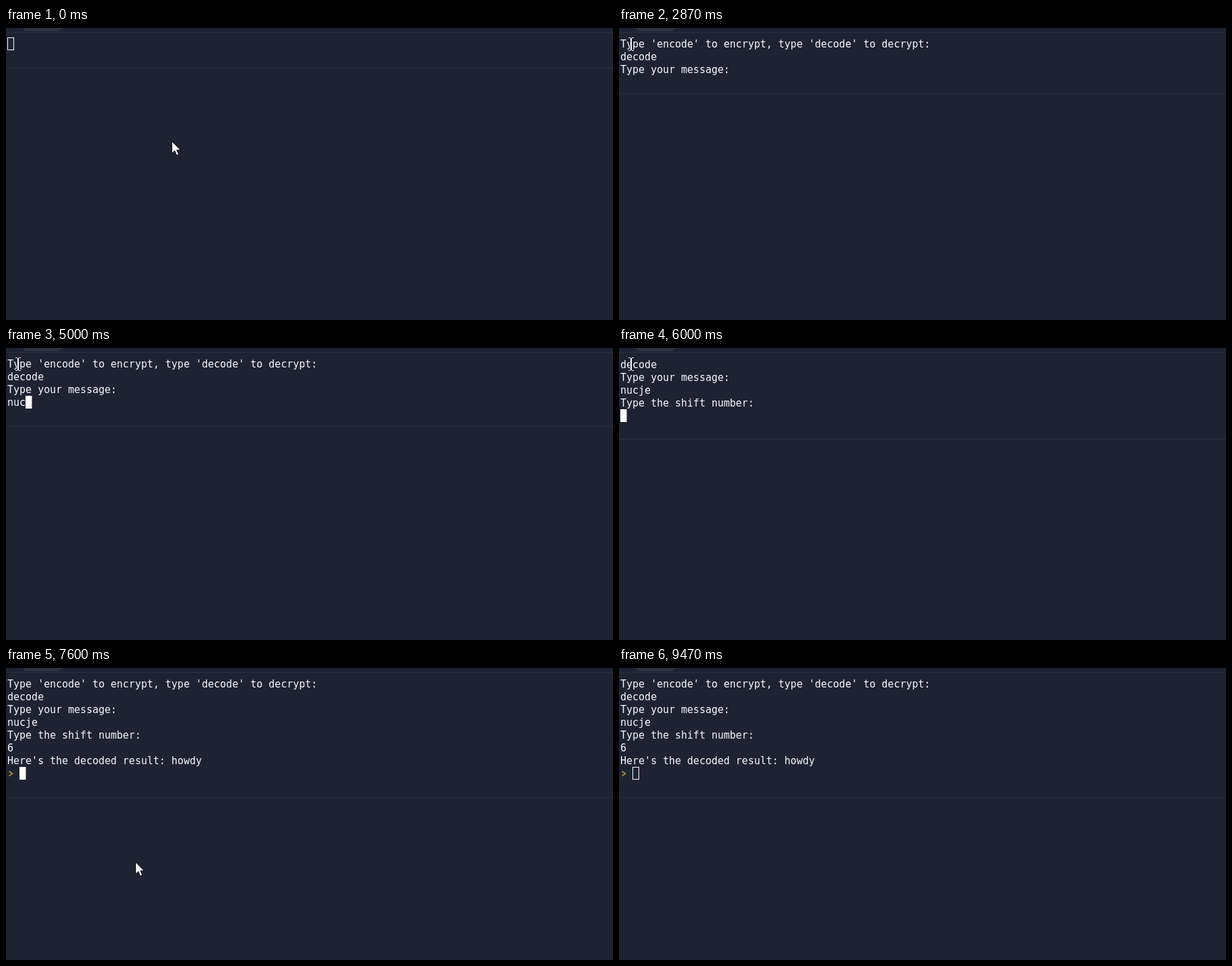
Write an HTML page that moves like this. It is 902 px wide and 434 px high and loops after 9600 ms.

```html
<!DOCTYPE html>
<html lang="en">
<head>
<meta charset="utf-8">
<title>Cipher console</title>
<style>
  html, body { margin: 0; width: 100%; height: 100%; overflow: hidden; background: #1e2333; }
  svg { display: block; }
  text { font: 15px "DejaVu Sans Mono", monospace; fill: #f5f9fc; white-space: pre; }
</style>
</head>
<body>
<svg width="902" height="434" viewBox="0 0 902 434">
  <rect width="902" height="434" fill="#1e2333"/>
  <rect x="25" y="-8" width="58" height="13" rx="6" fill="#2b3042"/>
  <rect y="6" width="902" height="1" fill="#2b3142"/>
  <rect id="divider" width="902" height="1" fill="#2b3142"/>
  <g id="lines"></g>
  <path id="prompt" d="M4.5 153.5L9.5 157L4.5 160.5" fill="none" stroke="#a98c2c" stroke-width="1.8"/>
  <rect id="block" fill="#fff"/>
  <rect id="frame" fill="none" stroke="#fff"/>
  <g id="beam">
    <path d="M-4 -9.5H-1M1 -9.5H4M0 -8.5V8.5M-4 9.5H-1M1 9.5H4" fill="none" stroke="#1e2333" stroke-width="4"/>
    <path d="M-4 -9.5H-1M1 -9.5H4M-4 9.5H-1M1 9.5H4" fill="none" stroke="#fff"/>
    <rect x="-1" y="-9" width="2" height="18" fill="#fff"/>
  </g>
  <path id="arrow" d="M.5 .5V18.2L4.6 14.4L7.6 21.2L10.6 19.8L7.7 13.3H13.3Z" fill="#fff" stroke="#0c0e15"/>
</svg>
<script>
const LOOP = 9600, RATE = 15, ROW = 19, CELL = 9.03, LEFT = 2;
const $ = id => document.getElementById(id);
const ASK = [
  "Type 'encode' to encrypt, type 'decode' to decrypt:",
  "decode",
  "Type your message:"
];
const SHIFT = [...ASK, "nucje", "Type the shift number:"];
const DONE = [...SHIFT, "6", "Here's the decoded result: howdy"];

// Console states by tick; cur = [column, row], top = hidden rows, dy = scroll remainder
const screens = [
  { at: 0, text: [], cur: [0, 0], hollow: true, rows: 2 },
  { at: 16, text: [], cur: [0, 0], rows: 2 },
  { at: 42, text: ASK, rows: 4, dy: 1 },
  { at: 43, text: ASK, rows: 4 },
  { at: 61, text: ASK, cur: [0, 3], top: 1, rows: 4 },
  ...[[63, "n"], [65, "nu"], [75, "nuc"], [77, "nucj"], [78, "nucje"]].map(([at, word]) =>
    ({ at, text: [...ASK, word], cur: [word.length, 3], rows: 5 })),
  { at: 83, text: SHIFT, rows: 6, dy: 1 },
  { at: 90, text: SHIFT, cur: [0, 5], top: 1, rows: 6, dy: 1 },
  { at: 92, text: [...SHIFT, "6"], cur: [1, 5], rows: 6, dy: 1 },
  { at: 95, text: DONE, cur: [2, 7], rows: 9, prompt: true },
  { at: 142, text: DONE, cur: [2, 7], rows: 9, prompt: true, hollow: true }
];

// Pointer hot spot: [tick, x, y]
const hover = [[7, 19, 21], [8, 23, 22], [10, 21, 23], [11, 20, 23], [12, 18, 24]];
const leave = [[108, 18, 24], [109, 25, 34], [110, 51, 70], [111, 92, 126], [112, 138, 192],
  [113, 174, 248], [114, 192, 288], [117, 188, 324], [120, 160, 362], [123, 111, 408], [124, 99, 420]];

const latest = (list, key, tick) => list.filter(s => s[key] <= tick).pop();

function along(path, tick) {
  const i = path.findIndex(p => p[0] >= tick);
  const b = path[i], a = path[Math.max(0, i - 1)];
  const k = b === a ? 0 : (tick - a[0]) / (b[0] - a[0]);
  return [1, 2].map(n => Math.round(a[n] + (b[n] - a[n]) * k));
}

function pointer(tick) {
  if (tick < 2) return { kind: "arrow", pos: [246, 168] };
  if (tick < 7 || tick > 124) return {};
  if (tick < 108) return { kind: "beam", pos: latest(hover, 0, tick).slice(1) };
  const pos = along(leave, tick);
  return { kind: pos[1] < 190 ? "beam" : "arrow", pos };
}

function set(el, attrs) {
  for (const name in attrs) el.setAttribute(name, attrs[name]);
}
function show(el, on) {
  el.style.display = on ? "" : "none";
}

const rows = DONE.map(() => {
  const el = document.createElementNS("http://www.w3.org/2000/svg", "text");
  el.setAttribute("x", LEFT);
  return $("lines").appendChild(el);
});

function draw(tick) {
  const { text, cur, hollow, prompt, rows: count, top = 0, dy = 0 } = latest(screens, "at", tick);
  rows.forEach((el, i) => {
    el.textContent = text[i + top] || "";
    set(el, { y: 29 + i * ROW + dy });
  });
  set($("divider"), { y: 21 + count * ROW });
  show($("prompt"), prompt);
  show($("block"), cur && !hollow);
  show($("frame"), cur && hollow);
  if (cur) {
    const x = Math.round(LEFT + cur[0] * CELL), y = 14 + (cur[1] - top) * ROW + dy;
    set($("block"), { x, y, width: 9.5, height: ROW });
    set($("frame"), { x: x + .5, y: y + .5, width: 9, height: ROW - 1 });
  }
  const { kind, pos } = pointer(tick);
  for (const id of ["beam", "arrow"]) {
    show($(id), kind === id);
    if (kind === id) set($(id), { transform: `translate(${pos})` });
  }
}

const start = performance.now();
function loop() {
  const t = (performance.now() - start) % LOOP;
  draw(Math.floor(t * RATE / 1000 + .06));
  requestAnimationFrame(loop);
}
draw(0);
requestAnimationFrame(loop);
</script>
</body>
</html>
```
